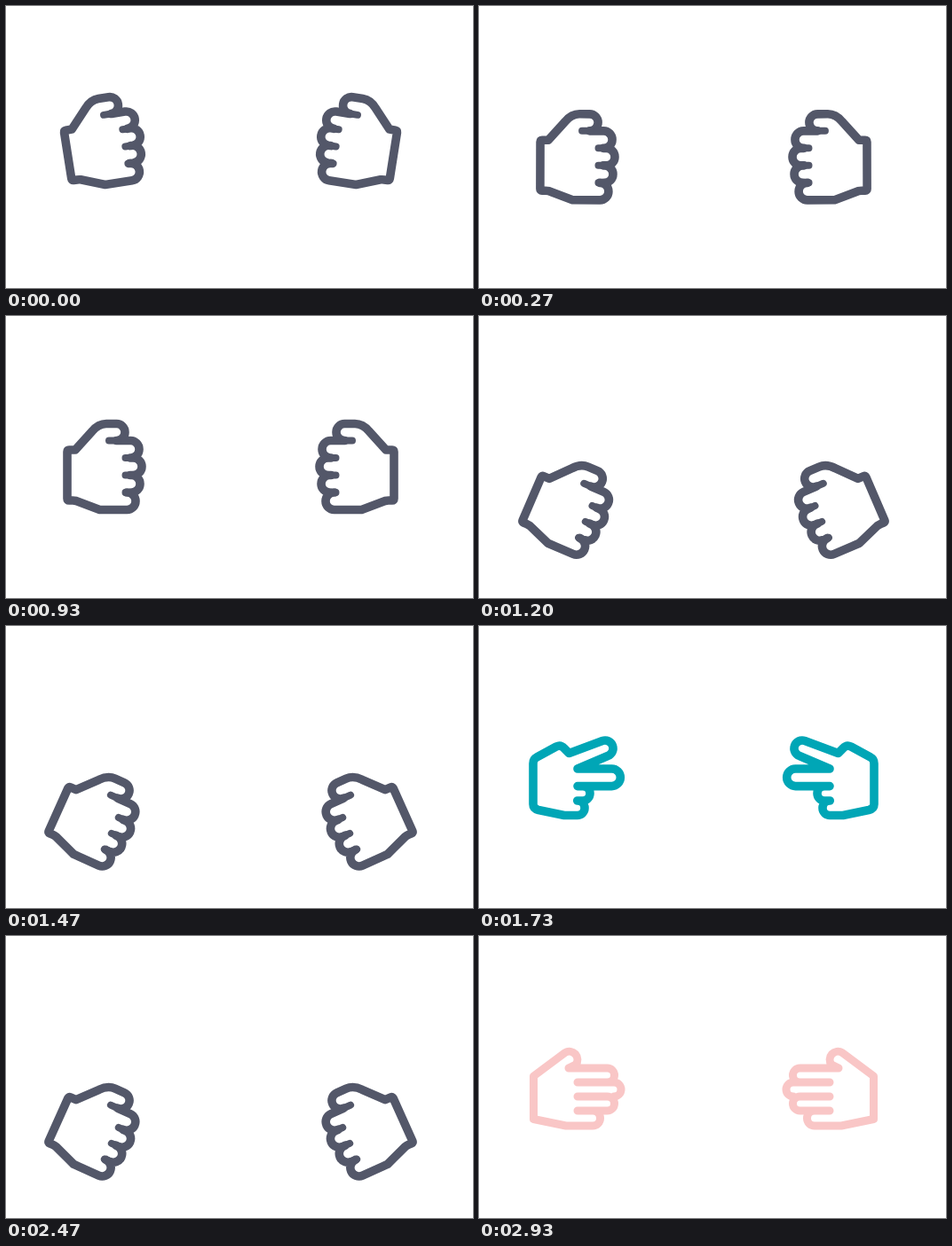
An HTML page for the animation above (2.99 s loop, 526 by 318 pixels).

```html
<!DOCTYPE html>
<html lang="en">
<head>
<meta charset="utf-8">
<title>Rock, scissors, paper</title>
<style>
  html, body { margin: 0; width: 100%; height: 100%; overflow: hidden; background: #fff; }
  svg { display: block; width: 526px; height: 318px; }
  path { fill: none; stroke-linecap: round; stroke-linejoin: round; }
  #creases { stroke-width: 8px; }
</style>
</head>
<body>
<svg viewBox="0 0 526 318">
  <g id="hand"><path id="outline"/><path id="creases"/></g>
  <use href="#hand" transform="translate(506 0) scale(-1 1)"/>
</svg>
<script>
  const LOOP = 2990, ROUND = 15, STEP = 1000 / 15;
  const [hand, outline, creases] =
    ['hand', 'outline', 'creases'].map(id => document.getElementById(id));

  // A fingertip: line along the top, then a half circle down to the next one.
  const finger = (from, tip, y, h) =>
    `M${from} ${y}H${tip - h / 2}a${h / 2} ${h / 2} 0 0 1 0 ${h}`;

  const rock = {
    color: '#535769', width: 9.6,
    d: finger(125, 150, 140.5, 19.5) + finger(140, 153, 160, 19.5) +
       finger(140, 151, 179.5, 19.5) + finger(136, 146, 199, 19.5) +
       'H105.5L79 208.5Q77 208 75 208H71Q69 208 69 206V153Q69 151 71 151H78' +
       'L97 130Q104 121.5 113 121.5H124.5a9.5 9.5 0 0 1 0 19',
    creases: 'M116 140.5H126M134.5 160H141M134.5 179.5H141M134.5 199H138'
  };
  const scissors = {
    color: '#00a6b6', width: 9.6,
    d: 'M101.5 143.5L139 129.5A9 9 0 0 1 145 146.5L111 161' +
       finger(111, 159.3, 161, 19.6) + 'H111' +
       finger(111, 125, 180.6, 16.4) + 'H111' + finger(111, 119, 197, 16.5) +
       'H96L67 207.5Q61 206 61 201V155Q61 150 65 148L87 136Q92 133.5 96 138L101.5 143.5'
  };
  const paper = {
    color: '#f9c6c6', width: 9,
    d: finger(101, 152.5, 149, 16) + finger(111, 160, 165, 16) +
       finger(111, 152.5, 181, 16) + 'H111' + finger(111, 136.5, 197, 17) +
       'H98L61.5 206.5V158L97 131.5a9.2 9.2 0 0 1 12 13.5L101 149'
  };
  const reveals = [rock, scissors, paper];

  // Arm swing: [step within the round, angle]
  const swing = [[-0.75, 0], [1, -23], [3, 23.3], [5, -23], [7, 24.2], [9, -22], [11, 0], [15, 0]];

  function angleAt(step) {
    const i = swing.findIndex(key => key[0] > step);
    const [t0, a0] = swing[i - 1], [t1, a1] = swing[i];
    const ease = (1 - Math.cos(Math.PI * (step - t0) / (t1 - t0))) / 2;
    return a0 + (a1 - a0) * ease;
  }

  function draw(now) {
    // The motion advances in 15 pictures per second.
    const count = Math.floor((now % LOOP + 5) / STEP);
    const step = count % ROUND;
    const pose = step < 10 ? rock : reveals[Math.floor(count / ROUND) % 3];
    outline.setAttribute('d', pose.d);
    outline.setAttribute('stroke-width', pose.width);
    creases.setAttribute('d', pose.creases || '');
    hand.setAttribute('stroke', pose.color);
    hand.setAttribute('transform', `rotate(${angleAt(step).toFixed(2)} 0 170)`);
  }

  const start = performance.now();
  function tick() {
    draw(performance.now() - start);
    requestAnimationFrame(tick);
  }
  tick();
</script>
</body>
</html>
```
